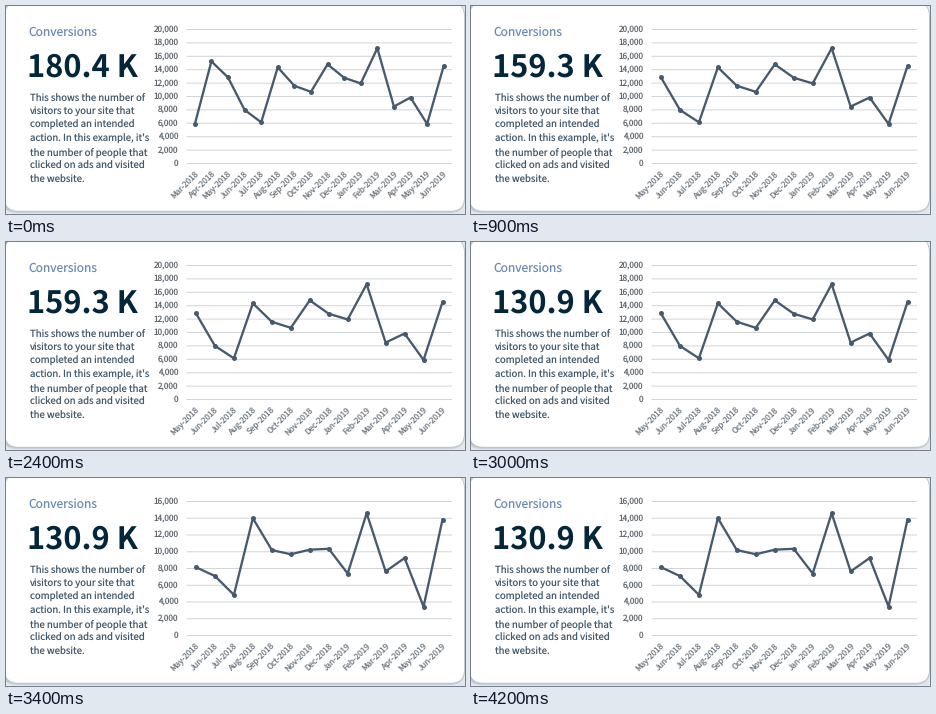
Recreate the animation shown at these times as a matplotlib script. Size 459 by 208 pixels, loop 4.3 s.

```python
import matplotlib.pyplot as plt
from matplotlib.animation import FuncAnimation
from matplotlib.patches import FancyBboxPatch

W, H, DPI = 459, 208, 64
STEP, LOOP = 100, 4300
LEFT, RIGHT, TOP, BASE = 180.5, 446, 23.5, 157.5

SLATE, NAVY, INK = "#475a6d", "#03263b", "#44596a"
TITLE, LABEL, TILTED, GRID = "#6d8bb3", "#63696f", "#747c84", "#d2d5d8"

MONTHS = "Jan Feb Mar Apr May Jun Jul Aug Sep Oct Nov Dec".split()
VISITS = [5850, 15250, 12850, 8000, 6150, 14350, 11600, 10700,
          14800, 12800, 11950, 17200, 8500, 9850, 5900, 14550]
ACTIONS = [8150, 7100, 4850, 14000, 10200, 9700, 10250,
           10350, 7400, 14600, 7650, 9250, 3450, 13850]
# start time in ms, then what is shown from that time on
TOTALS = [(0, "180.4 K"), (500, "159.3 K"), (3000, "130.9 K")]
CHARTS = [(0, (VISITS, 20000)), (900, (VISITS[2:], 20000)),
          (3400, (ACTIONS, 16000))]
NOTE = ["This shows the number of", "visitors to your site that",
        "completed an intended", "action. In this example, it's",
        "the number of people that", "clicked on ads and visited",
        "the website."]

plt.rcParams["font.family"] = ["Noto Sans CJK JP", "Liberation Sans"]
plt.rcParams["text.hinting"] = "none"

fig = plt.figure(figsize=(W / DPI, H / DPI), dpi=DPI, facecolor="#e3e8eb")
ax = fig.add_axes([0, 0, 1, 1])
ax.set(xlim=(0, W), ylim=(H, 0))
ax.axis("off")


def pt(px):
    return px * 72 / DPI


def text(x, y, s, px, color, **kw):
    kw.setdefault("va", "baseline")
    return ax.text(x, y, s, fontsize=pt(px), color=color, **kw)


def card(x0, y0, x1, y1, r, **kw):
    ax.add_patch(FancyBboxPatch(
        (x0, y0), x1 - x0, y1 - y0, lw=0,
        boxstyle=f"round,pad=0,rounding_size={r}", **kw))


def current(track, t):
    return [value for start, value in track if start <= t][-1]


def month_label(back):
    """Label of the month that lies `back` months before Jun-2019."""
    n = 2019 * 12 + 5 - back
    return f"{MONTHS[n % 12]}-{n // 12}"


def draw_chart(values, top):
    parts = []
    rows = top // 2000
    for i in range(rows + 1):
        y = BASE - (BASE - TOP) * i / rows
        parts += ax.plot([LEFT, RIGHT], [y, y], color=GRID, lw=pt(1),
                         snap=False, solid_capstyle="butt")
        parts.append(text(172.5, y + 2.8, f"{2000 * i:,}", 8.2, LABEL,
                          ha="right"))
    gap = (RIGHT - LEFT) / len(values)
    xs = [LEFT + gap * (i + 0.5) for i in range(len(values))]
    ys = [BASE - (BASE - TOP) * v / top for v in values]
    parts += ax.plot(xs, ys, color=SLATE, lw=pt(2.3), marker="o",
                     ms=pt(5), mew=0, snap=False,
                     solid_joinstyle="round")
    for i, x in enumerate(xs):
        parts.append(text(x + 4, 168.3, month_label(len(xs) - 1 - i), 8.1,
                          TILTED, ha="right", rotation=45,
                          rotation_mode="anchor"))
    return parts


for k in range(3, 0, -1):
    card(-2 - k, -4, 458 + k * 0.5, 204.8 + k * 0.8, 13 + k,
         color="#8f9ca8", alpha=0.2)
card(-1, -3, 458, 204.8, 13, color="white")

text(22, 29.5, "Conversions", 12, TITLE)
for i, line in enumerate(NOTE):
    text(23.5, 95 + 13.6 * i, line, 9.6, INK)
total = text(21, 71, "", 30.8, NAVY, weight="bold")

charts = [(start, draw_chart(*spec)) for start, spec in CHARTS]


def update(i):
    t = i * STEP
    total.set_text(current(TOTALS, t))
    shown = current(charts, t)
    for _, parts in charts:
        for part in parts:
            part.set_visible(parts is shown)
    return [total]


anim = FuncAnimation(fig, update, frames=LOOP // STEP, interval=STEP,
                     init_func=lambda: update(0), repeat=True,
                     repeat_delay=0, blit=False)
plt.show()
```
